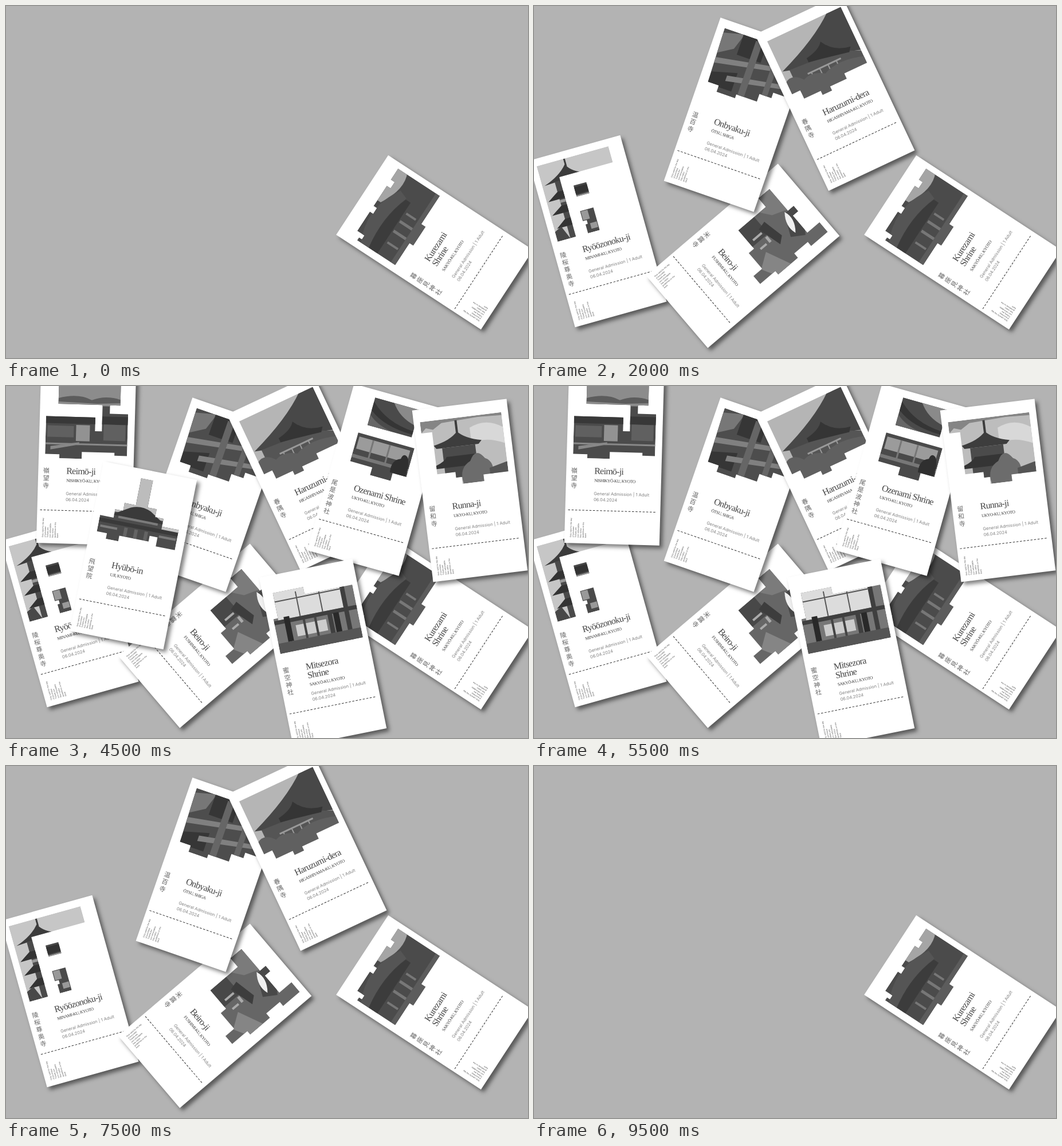
An HTML page that plays this animation: 911x615 px, repeating every 10 s.

```html
<!DOCTYPE html>
<html lang="en">
<head>
<meta charset="utf-8">
<title>Tickets</title>
<style>
  html, body { margin: 0; width: 100%; height: 100%; overflow: hidden; background: #b3b3b3; }
  svg { display: block; width: 100vw; height: 100vh; }
  .ticket { filter: drop-shadow(5px 5px 3.5px rgba(0, 0, 0, .5)); }
  .name { font: 16px "Liberation Serif", serif; letter-spacing: -.75px; fill: #444; }
  .place { font: 7.5px "Liberation Serif", serif; letter-spacing: -.45px; fill: #333; }
  .info { font: 7.5px Inter, sans-serif; fill: #808080; }
  .kanji { font: 200 11px "Noto Sans CJK JP", "Noto Sans CJK", serif; fill: #666; text-anchor: middle; }
  .terms { font: 3.4px Inter, sans-serif; fill: #444; }
</style>
</head>
<body>
<svg id="stage" viewBox="0 0 911 615"></svg>
<script>
const WIDTH = 166, HEIGHT = 302, STEP = 500, LOOP = 10000;
const TERMS = ['Only valid for the day', 'of purchase', 'Tickets are', 'non-refundable',
  'See visitor', 'guidelines on the', 'back'];
const stage = document.getElementById('stage');
const tickets = [];

const text = (kind, x, y, content, extra = '') =>
  `<text class="${kind}" x="${x}" y="${y}" ${extra}>${content}</text>`;

// Every ticket is laid out upright from its top left corner, then turned about its centre.
function addTicket({ x, y, angle, name, place, kanji, mask, base, shapes,
                     nameY = 180, placeY = 194, infoY = 217, kanjiY = 175 }) {
  const id = 'photo' + tickets.length;
  const photo = shapes.map(([fill, d]) => `<path fill="${fill}" d="${d}"/>`).join('');
  const names = name.map((line, i) => text('name', 49, nameY + i * 15.5, line)).join('');
  const column = [...kanji].map((c, i) => text('kanji', 14, kanjiY + 4 + i * 13, c)).join('');
  const terms = TERMS.map((line, i) => text('terms', 0, 0, line,
    `transform="translate(${12 + i * 4.3} 292) rotate(-90)"`)).join('');
  stage.insertAdjacentHTML('beforeend', `
    <g class="ticket">
      <g transform="translate(${x} ${y}) rotate(${angle}) translate(${-WIDTH / 2} ${-HEIGHT / 2})">
        <clipPath id="${id}"><path d="${mask}"/></clipPath>
        <rect width="${WIDTH}" height="${HEIGHT}" fill="#fff"/>
        <g clip-path="url(#${id})"><rect width="${WIDTH}" height="170" fill="${base}"/>${photo}</g>
        ${names}${column}${terms}
        ${text('place', 49.5, placeY, place)}
        ${text('info', 49, infoY, 'General Admission | 1 Adult')}
        ${text('info', 49, infoY + 10.5, '06.04.2024')}
        <path d="M5 244H160" stroke="#333" stroke-dasharray="3.6 2.6"/>
      </g>
    </g>`);
  tickets.push(stage.lastElementChild);
}

addTicket({
  x: 748, y: 413, angle: -56.8, name: ['Kurezami', 'Shrine'], place: 'SAKYŌ-KU, KYOTO', kanji: '暮座見神社',
  nameY: 162, placeY: 193, infoY: 214, kanjiY: 152.5,
  mask: 'M12 36H18V42H26V27H66V34H78V27H120V35H133V27H156V114H97V123H58V115H12Z',
  base: '#4b4b4b',
  shapes: [
    ['#a5a5a5', 'M90 20H160V44Q132 58 90 34Z'],
    ['#555', 'M12 44Q70 16 126 52L120 68Q70 50 12 60Z'],
    ['#3c3c3c', 'M12 60Q70 50 118 68V78H12Z'],
    ['#777', 'M36 82h4v22h-4zM58 80h5v26h-5zM78 80h5v26h-5zM96 82h4v20h-4z'],
    ['#5c5c5c', 'M12 106H156V125H12Z']]
});

addTicket({
  x: 111, y: 393.5, angle: -15.6, name: ['Ryōōzonoku-ji'], place: 'MINAMI-KU, KYOTO', kanji: '陵桜尊奥寺',
  mask: 'M11 13H141V42H44V150H11ZM64 63H87V83H64ZM63 109H87V150H66V134H70V127H63Z',
  base: '#c6c6c6',
  shapes: [
    ['#3c3c3c', 'M59 13h3v14h-3zM59 23Q68 40 92 46L15 50Q45 40 59 23Z'],
    ['#4a4a4a', 'M34 48H90V150H34Z'],
    ['#333', 'M14 79L34 66H90V79ZM14 104L34 91H70V104ZM16 128L34 115H60V128Z'],
    ['#999', 'M34 81H90V86H34ZM64 110h12v16h-12zM74 134h12v10h-12z'],
    ['#484848', 'M8 134L24 126L34 150H8Z']]
});

addTicket({
  x: 364.5, y: 436.5, angle: 49.6, name: ['Beiro-ji'], place: 'FUSHIMI-KU, KYOTO', kanji: '米露寺',
  mask: 'M24 40H74V27H86V39H125V11H147V49H138V80H148V125H140V160H122V140H86V128H44V65H24Z',
  base: '#666',
  shapes: [
    ['#7b7b7b', 'M24 38H72L62 66L44 80L24 66Z'],
    ['#484848', 'M74 20H90L126 44L112 66L74 48ZM44 92H82V130H44Z'],
    ['#f0f0f0', 'M72 46Q92 38 112 55Q92 62 72 46Z'],
    ['#3d3d3d', 'M62 84L100 76L110 88L66 100Z'],
    ['#aaa', 'M72 100h4v20h-4zM84 96h12v5h-12zM92 106h4v14h-4z'],
    ['#858585', 'M104 116L148 96V128L122 142Z']]
});

addTicket({
  x: 354.5, y: 190, angle: 19.1, name: ['Onbyaku-ji'], place: 'ŌTSU, SHIGA', kanji: '温百寺',
  mask: 'M13 15H155V94H130V104H108V118H70V125H36V113H16Z',
  base: '#4d4d4d',
  shapes: [
    ['#777', 'M10 24L50 14L40 44L14 60Z'],
    ['#363636', 'M48 14H92V52H48ZM16 94L60 82V116H16Z'],
    ['#808080', 'M14 68L156 44V52L14 78ZM44 92L140 76V84L44 102Z'],
    ['#666', 'M72 18h12v104h-12zM112 40h10v70h-10z']]
});

addTicket({
  x: 525, y: 151, angle: -25.2, name: ['Haruzumi-dera'], place: 'HIGASHIYAMA-KU, KYOTO', kanji: '春隅寺',
  mask: 'M14 20H156V128H112V138H80V146H62V138H30V122H14Z',
  base: '#b5b5b5',
  shapes: [
    ['#484848', 'M160 10H140Q100 48 16 79Q74 98 120 92L160 104Z'],
    ['#555', 'M28 82L118 88L156 104V126H28Z'],
    ['#353535', 'M64 76Q90 72 98 60Q112 86 142 90L136 98Q98 90 64 84Z'],
    ['#999', 'M54 100H118V103H54ZM60 103h2v9h-2zM76 103h2v9h-2zM92 103h2v9h-2zM108 103h2v9h-2z'],
    ['#606060', 'M12 100Q28 88 44 108Q62 100 82 114Q112 100 158 116V150H12Z']]
});

addTicket({
  x: 140, y: 125.5, angle: 1.6, name: ['Reimō-ji'], place: 'NISHIKYŌ-KU, KYOTO', kanji: '嶺望寺',
  mask: 'M32 10H140V58H122V73H154V146H132V141H75V153H36V146H11V80H97V104H109V58H32Z',
  base: '#4b4b4b',
  shapes: [
    ['#8c8c8c', 'M30 8H142V60H30Z'],
    ['#5c5c5c', 'M32 48Q66 38 90 50Q114 40 140 48V54L100 56L32 54Z'],
    ['#383838', 'M10 78H156V92H10Z'],
    ['#929292', 'M64 94H88V122H64Z'],
    ['#606060', 'M14 96H60V116H14ZM112 92H150V120H112Z'],
    ['#888', 'M10 126H156V129H10ZM20 132L70 124V128L20 138Z']]
});

addTicket({
  x: 646.5, y: 164, angle: 15.7, name: ['Ozenami Shrine'], place: 'UKYO-KU, KYOTO', kanji: '尾是波神社',
  mask: 'M42 13H122V63H42ZM30 80H132V132H107V146H70V132H30Z',
  base: '#4a4a4a',
  shapes: [
    ['#8a8a8a', 'M76 12H124V42Q92 36 76 12Z'],
    ['#353535', 'M42 20Q72 50 122 52V58Q70 58 42 36Z'],
    ['#666', 'M42 44Q60 60 90 63H42Z'],
    ['#9b9b9b', 'M34 86H126V108H34Z'],
    ['#777', 'M58 86h3v34h-3zM88 86h3v34h-3zM30 118H132V124H30Z'],
    ['#2f2f2f', 'M102 132Q98 110 114 104Q116 92 124 98Q132 106 130 132Z']]
});

addTicket({
  x: 809.5, y: 182.5, angle: -7, name: ['Runna-ji'], place: 'UKYO-KU, KYOTO', kanji: '留和寺',
  mask: 'M11 22H154V126H110V138H72V126H62V116H30V42H11Z',
  base: '#bdbdbd',
  shapes: [
    ['#d8d8d8', 'M96 42Q126 28 154 48V76Q120 60 96 70Z'],
    ['#858585', 'M11 22H154V27L112 25L48 28L32 38L20 34L11 42Z'],
    ['#3d3d3d', 'M71 26h4v28h-4zM73 46Q86 60 114 66L108 72H34L30 66Q60 60 73 46Z'],
    ['#4b4b4b', 'M44 72H102V126H44Z'],
    ['#353535', 'M28 102Q46 96 50 88H98L116 102V107H28Z'],
    ['#6c6c6c', 'M74 138Q68 110 90 100Q102 76 116 98Q134 106 126 138Z'],
    ['#555', 'M122 116L154 108V128H122Z']]
});

addTicket({
  x: 553, y: 466.5, angle: -11.4, name: ['Mitsezora', 'Shrine'], place: 'SAKYŌ-KU, KYOTO', kanji: '蜜空神社',
  nameY: 174, placeY: 203, infoY: 219, kanjiY: 168,
  mask: 'M18 31H72V44H157V138H10V76H18Z',
  base: '#777',
  shapes: [
    ['#dcdcdc', 'M18 31H136V80H18Z'],
    ['#3f3f3f', 'M10 80H157V87H10ZM134 40h8v100h-8zM104 80h8v58h-8z'],
    ['#292929', 'M28 76h10v44h-10zM114 86h10v44h-10z'],
    ['#555', 'M10 120H157V138H10ZM56 36h2v44h-2zM96 44h2v36h-2zM18 46H136V48H18Z'],
    ['#ccc', 'M46 94H100V114H46Z'],
    ['#444', 'M60 86h4v34h-4zM80 86h4v34h-4z']]
});

addTicket({
  x: 222.5, y: 296, angle: 11.2, name: ['Hyūbō-in'], place: 'UJI, KYOTO', kanji: '飛望院',
  mask: 'M70 16H91V64H107V78H122V92H152V128H118V112H104V122H52V132H30V122H12V93H36V78H50V64H70Z',
  base: '#4c4c4c',
  shapes: [
    ['#bcbcbc', 'M70 16H91V64H122V82H36V64H70Z'],
    ['#c8c8c8', 'M122 92H152V98H122Z'],
    ['#3a3a3a', 'M62 70Q80 62 98 70L126 88H32ZM12 97H152V104H12Z'],
    ['#7b7b7b', 'M44 88H114V92H44ZM16 109H46V113H16ZM120 108H150V112H120Z'],
    ['#646464', 'M58 106h6v16h-6zM76 106h6v16h-6zM94 106h6v16h-6z']]
});

// One ticket lands every step, then they leave in reverse order.
function draw(now) {
  const step = Math.floor((now % LOOP) / STEP);
  const count = Math.min(1 + step, 20 - step);
  tickets.forEach((ticket, i) => { ticket.style.display = i < count ? '' : 'none'; });
}

const start = performance.now();
function tick() {
  draw(performance.now() - start);
  requestAnimationFrame(tick);
}
tick();
</script>
</body>
</html>
```
